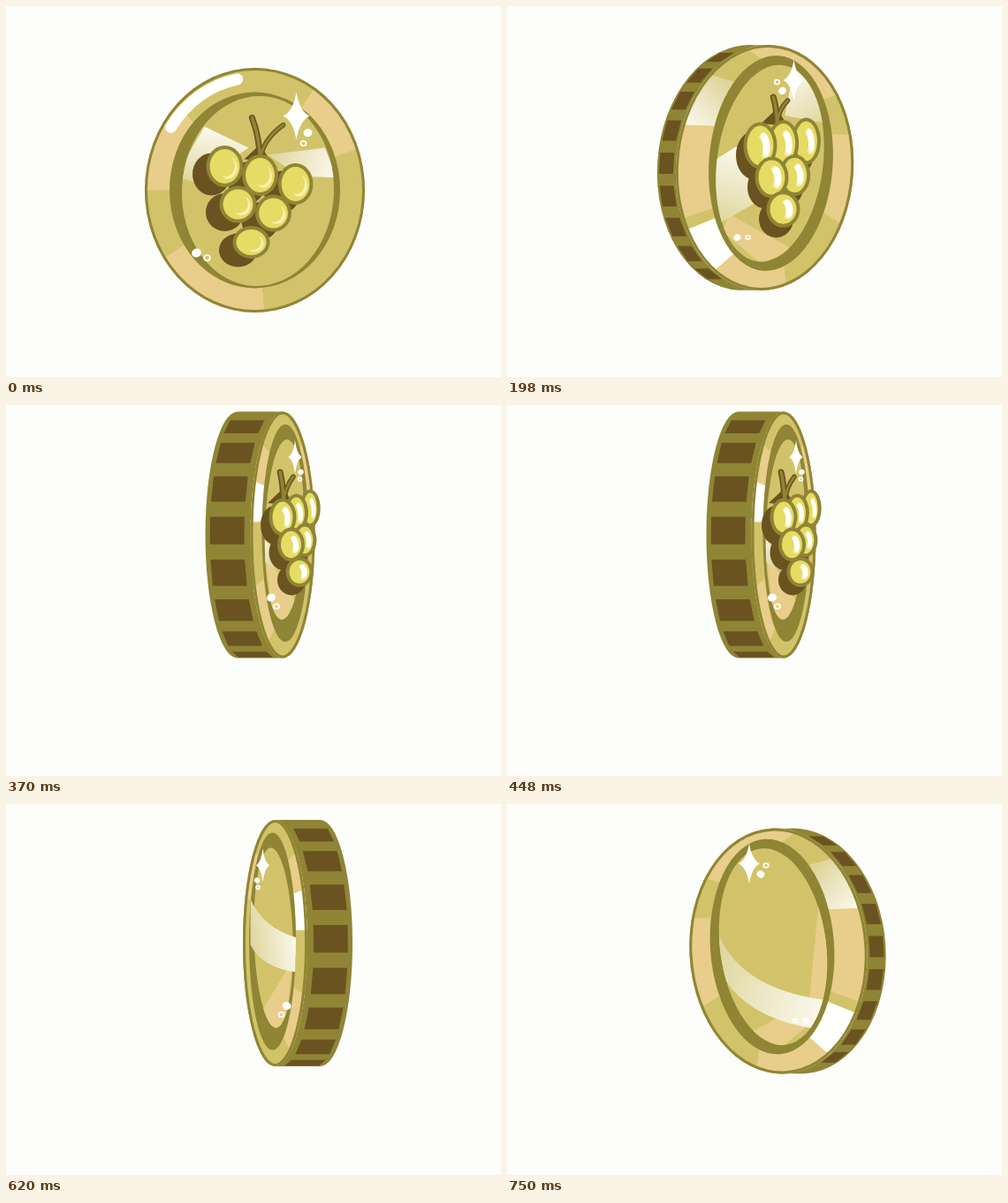
An HTML page with a canvas that plays this animation: 560 px wide and 420 px high, repeating every 0.87 s.

```html
<!DOCTYPE html>
<html lang="en">
<head>
<meta charset="utf-8">
<title>Spinning grape coin</title>
<style>
html, body { margin: 0; width: 100%; height: 100%; overflow: hidden; background: #fdfdfc; }
canvas { display: block; }
</style>
</head>
<body>
<canvas id="stage" width="560" height="420"></canvas>
<script>
const ctx = document.getElementById('stage').getContext('2d');
const PAPER = '#fdfdfc', GOLD = '#d2c36b', OLIVE = '#8f8535', BROWN = '#6a5320',
  PEACH = '#e8ce8a', WHITE = '#fffffd', GRAPE = '#e6db63', PALE = '#f4efb4';
const rad = deg => deg * Math.PI / 180;

// Ellipses are { x, y, rx, ry, tilt }, relative to the centre of the face.
const ellipse = (x, y, rx, ry, tilt = 0) => ({ x, y, rx, ry, tilt });

// Each view leans its edge to the left; patches are [colour, from, to] in degrees.
const FRONT = {
  face: ellipse(0, 0, 124.5, 138.5), well: ellipse(0, 0, 96.5, 111), dish: ellipse(3.5, 1, 86, 107.5, 0.04),
  depth: 0,
  patches: [[PEACH, 180, 224], [PEACH, 303, 340], [PEACH, 85, 146]],
  bunch: { at: [-34, -27], col: [40, 10], row: [15, 43], rx: 18.5, ry: 21, shrink: 0.97, shade: [-15, 9], gloss: false },
  stem: [6, -40, 26, 45],
  glazes: [[-57, -72, -7, -48, -65, -8, -90, -15], [93, -14, 50, -16, 15, -40, 79, -48]],
  star: [47, -84, 15, 27],
  glints: [[60, -65, 5, -5, 12], [-66, 71, 5.5, 12, 5.5]],
};
const WIDE = {
  face: ellipse(0, 0, 100.5, 139, 0.06), well: ellipse(7, -5, 70, 122, 0.07), dish: ellipse(6, -5, 60, 112, 0.13),
  depth: 21, step: 15.6,
  patches: [[PEACH, 153, 198], ['glaze', 198, 227], [PEACH, 254, 321], [PEACH, 342, 385],
    [WHITE, 120, 147], [PEACH, 71, 120]],
  tint: [-40, 53, 31, 92, 0, 112, -48, 72],
  bunch: { at: [-5, -25], col: [26, -2.5], row: [13, 36], rx: 16.5, ry: 24, shrink: 0.92, shade: [-8, 11], gloss: true },
  stem: [14, -55, 12, 28],
  glazes: [[-32, -24, -9, 39, -51, 63, -70, 0], [33, -113, 23, -59, 70, -50, 60, -100]],
  sweep: { from: [73, -33], via: [51, 44], to: [-58, 56], thick: [37, 34] },
  strip: [-47, -68, -66, -26, -66, 60, -35, 55],
  star: [33, -99, 12, 23],
  glints: [[20, -87, 4.5, -6, -10], [-31, 79, 4, 12, 0]],
};
const MID = {
  face: ellipse(0, 0, 69, 141), well: ellipse(3, -7, 48.5, 124, 0.03), dish: ellipse(4, -5, 36.5, 115, 0.03),
  depth: 50, step: 18,
  patches: [[PEACH, 142, 187], [WHITE, 187, 217], [PEACH, 222, 266], [PEACH, 314, 360],
    [WHITE, 114, 134], [PEACH, 52, 114]],
  tint: [-28, -58, -24, -115, 25, -115, 36, -76],
  bunch: { at: [-9, -18], col: [23.5, -3], row: [14, 35], rx: 15.5, ry: 25, shrink: 0.87, shade: [-7, 13], gloss: true },
  stem: [6, -43, 13, 36],
  glazes: [[36, -45, -10, -25, -32, -45, 32, -78]],
  sweep: { from: [41, -70], via: [14, 0], to: [-36, 19], thick: [66, 37] },
  star: [16, -97, 14, 24],
  glints: [[34, -81, 4.5, -7, 5], [-20, 76, 5, 6.5, 6.5]],
};
const NARROW = {
  face: ellipse(0, 0, 36.5, 139.5), well: ellipse(3, -2, 26.5, 123), dish: ellipse(2, -6, 22, 102, 0.03),
  depth: 51, step: 20,
  patches: [[WHITE, 186, 206], [PEACH, 206, 228], [PEACH, 118, 155], [PEACH, 309, 338]],
  tint: [-20, 19, 14, 75, 0, 104, -13, 82],
  bunch: { at: [0, -20], col: [15.5, -5], row: [9.5, 31], rx: 13, ry: 19, shrink: 0.84, shade: [-9, 9], gloss: true },
  stem: [1, -41, 11, 33],
  glazes: [[-25, 0, -14, 12, -10, 38, -22, 30]],
  sweep: { from: [28, -50], via: [14, -17], to: [-25, -6], thick: [52, 39] },
  star: [14, -88, 7.5, 19],
  glints: [[20.5, -71, 3.3, -1, 8], [-13, 71, 5, 6, 10]],
};

// End time in ms, view, centre of the face, and whether the coin shows its mirrored back.
const POSES = [
  [120, FRONT, 281.5, 208.5, false],
  [250, WIDE, 291.5, 183, false],
  [370, MID, 312.5, 161, false],
  [500, NARROW, 313, 147, false],
  [620, MID, 298.5, 153, true],
  [750, NARROW, 304.5, 157.5, true],
  [870, WIDE, 307, 166.5, true],
];

function pointOn(e, deg) {
  const x = e.rx * Math.cos(rad(deg)), y = e.ry * Math.sin(rad(deg));
  const c = Math.cos(e.tilt), s = Math.sin(e.tilt);
  return [e.x + x * c - y * s, e.y + x * s + y * c];
}
const arc = (path, e, from, to, reverse) =>
  path.ellipse(e.x, e.y, e.rx, e.ry, e.tilt, rad(from), rad(to), reverse);
function whole(e) {
  const path = new Path2D();
  arc(path, e, 0, 360);
  return path;
}
function fill(color, path) {
  ctx.fillStyle = color;
  ctx.fill(path);
}
const oval = (color, ...e) => fill(color, whole(ellipse(...e)));
function polygon(pts) {
  const path = new Path2D();
  for (let i = 0; i < pts.length; i += 2) path.lineTo(pts[i], pts[i + 1]);
  path.closePath();
  return path;
}
function inside(path, draw) {
  ctx.save();
  ctx.clip(path);
  draw();
  ctx.restore();
}
function sheen(x0, y0, x1, y1) {
  const fade = ctx.createLinearGradient(x0, y0, x1, y1);
  fade.addColorStop(0, '#fbf9ee');
  fade.addColorStop(0.6, '#ebe4bf');
  fade.addColorStop(1, '#dfd59c');
  return fade;
}

function drawEdge({ face, depth, step }) {
  const back = { ...face, x: face.x - depth };
  const side = new Path2D();
  arc(side, back, 90, 270);
  arc(side, face, 270, 450);
  side.closePath();
  fill(OLIVE, side);
  for (let a = -62; a <= 78; a += step) {
    const [x0, y0] = pointOn(face, 180 - a + step * 0.32);
    const [x1, y1] = pointOn(face, 180 - a - step * 0.32);
    const outer = depth * 0.9, inner = depth * 0.14;
    fill(BROWN, polygon([x0 - outer, y0, x0 - inner, y0, x1 - inner, y1, x1 - outer, y1]));
  }
}

function drawFace({ face, well, dish, depth, patches, tint }) {
  const disc = whole(face);
  fill(GOLD, disc);
  for (const [color, from, to] of patches) {
    const sector = new Path2D();
    arc(sector, face, from, to);
    arc(sector, well, to, from, true);
    fill(color === 'glaze' ? sheen(-92, -50, -45, -95) : color, sector);
  }
  inside(disc, () => {
    ctx.strokeStyle = OLIVE;
    ctx.lineWidth = 6;
    ctx.stroke(disc);
  });
  if (!depth) {
    const shine = new Path2D();
    arc(shine, { ...face, rx: face.rx * 0.92, ry: face.ry * 0.92 }, 214, 260);
    ctx.strokeStyle = WHITE;
    ctx.lineWidth = 13;
    ctx.lineCap = 'round';
    ctx.stroke(shine);
  }
  fill(OLIVE, whole(well));
  fill(GOLD, whole(dish));
  if (tint) inside(whole(dish), () => fill(PEACH, polygon(tint)));
}

function drawStem([x, y, spread, height]) {
  const branch = (dx, dy, color, width) => {
    ctx.strokeStyle = color;
    ctx.lineWidth = width;
    ctx.lineCap = 'round';
    ctx.beginPath();
    ctx.moveTo(x, y + 6);
    ctx.quadraticCurveTo(x + dx * 0.1, y + dy * 0.5, x + dx, y + dy);
    ctx.stroke();
  };
  fill(BROWN, polygon([x - 18, y + 5, x, y - 12, x + 12, y + 8]));
  for (const [color, width] of [[BROWN, 7], [OLIVE, 3.5]]) {
    branch(-spread * 0.35, -height + 3, color, width);
    branch(spread, -height * 0.75, color, width * 0.8);
  }
}

function drawGrape(x, y, rx, ry, gloss) {
  oval(OLIVE, x, y, rx + 2.5, ry + 2.5);
  oval(GRAPE, x, y, rx - 1.5, ry - 1.5);
  if (gloss) {
    oval(PALE, x + rx * 0.28, y, rx * 0.42, ry * 0.62, -0.1);
    oval(WHITE, x + rx * 0.32, y - ry * 0.05, rx * 0.32, ry * 0.54, -0.12);
    oval(GRAPE, x - rx * 0.06, y + ry * 0.05, rx * 0.24, ry * 0.45, -0.1);
  } else {
    oval(PALE, x + rx * 0.22, y + ry * 0.08, rx * 0.55, ry * 0.6);
    oval(GRAPE, x + rx * 0.06, y - ry * 0.04, rx * 0.55, ry * 0.58);
  }
}

// A triangle of grapes: three, two, one.
function drawBunch({ at, col, row, rx, ry, shrink, shade, gloss }) {
  const grapes = [];
  for (let r = 0; r < 3; r++) {
    for (let c = 2 - r; c >= 0; c--) {
      grapes.push([at[0] + c * col[0] + r * row[0], at[1] + c * col[1] + r * row[1],
        rx * shrink ** c, ry * (1 - 0.12 * r)]);
    }
  }
  for (const [x, y, w, h] of grapes) oval(BROWN, x + shade[0], y + shade[1], w + 3, h + 3);
  for (const g of grapes) drawGrape(...g, gloss);
}

function drawSweep({ from, via, to, thick }) {
  const [x0, y0] = from, [cx, cy] = via, [x1, y1] = to, [t0, t1] = thick;
  const band = new Path2D();
  band.moveTo(x0, y0);
  band.quadraticCurveTo(cx, cy, x1, y1);
  band.lineTo(x1, y1 + t1);
  band.quadraticCurveTo(cx, cy + (t0 + t1) / 2, x0, y0 + t0);
  fill(sheen(x1, y1, x0, y0 + t0), band);
}

function drawSparkle({ star: [x, y, w, h], glints }) {
  const tips = [[0, -h], [w, 0], [0, h], [-w, 0]];
  const path = new Path2D();
  path.moveTo(x, y - h);
  tips.forEach(([ax, ay], i) => {
    const [bx, by] = tips[(i + 1) % 4];
    path.quadraticCurveTo(x + (ax + bx) * 0.24, y + (ay + by) * 0.2, x + bx, y + by);
  });
  fill(WHITE, path);
  for (const [gx, gy, r, dx, dy] of glints) {
    oval(WHITE, gx, gy, r, r * 0.9, -0.4);
    ctx.strokeStyle = WHITE;
    ctx.lineWidth = 1.7;
    ctx.stroke(whole(ellipse(gx + dx, gy + dy, r * 0.6, r * 0.55)));
  }
}

function drawCoin(view, x, y, back) {
  ctx.save();
  ctx.translate(x, y);
  if (back) ctx.scale(-1, 1);
  if (view.depth) drawEdge(view);
  drawFace(view);
  if (back) {
    inside(whole(view.dish), () => { if (view.strip) fill(PEACH, polygon(view.strip)); });
    inside(whole(view.depth > 50 ? view.well : view.dish), () => drawSweep(view.sweep));
  } else {
    inside(whole(view.dish), () => {
      for (const g of view.glazes) fill(sheen(g[0], g[1], g[4], g[5]), polygon(g));
    });
    drawStem(view.stem);
    drawBunch(view.bunch);
  }
  drawSparkle(view);
  ctx.restore();
}

function render() {
  const t = performance.now() % 870;
  const [, ...pose] = POSES.find(([end]) => t < end);
  ctx.fillStyle = PAPER;
  ctx.fillRect(0, 0, 560, 420);
  drawCoin(...pose);
  requestAnimationFrame(render);
}
render();
</script>
</body>
</html>
```
